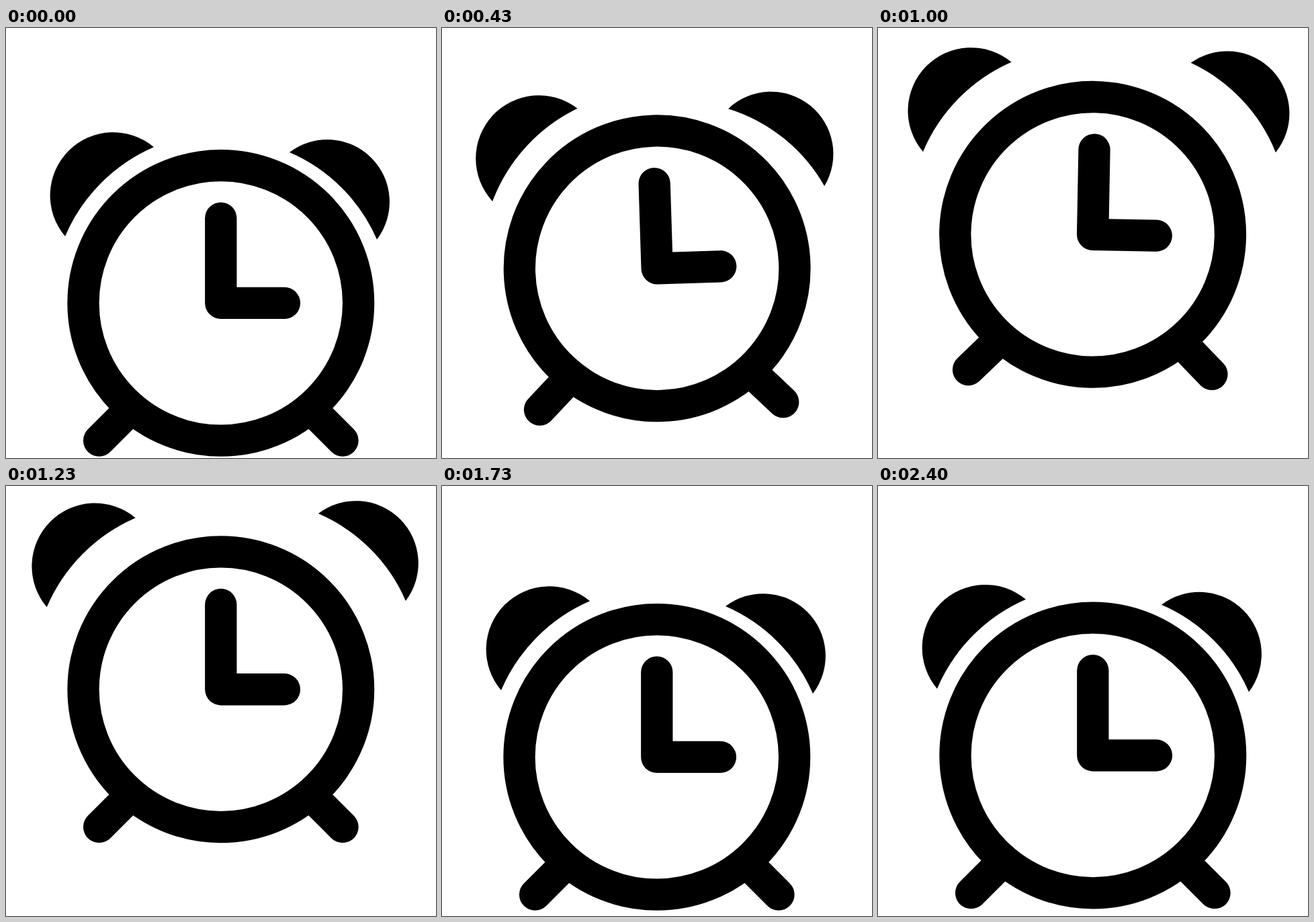
Recreate the animation shown at these times as an HTML page. Size 640x640 px, loop 3.61 s.

```html
<!DOCTYPE html>
<html lang="en">
<head>
<meta charset="utf-8">
<title>Alarm clock</title>
<style>
  html, body { margin: 0; height: 100%; overflow: hidden; background: #fff; }
  svg { display: block; width: 100%; height: 100%; }
  .line { fill: none; stroke: #000; stroke-width: 47.3; stroke-linecap: round; stroke-linejoin: round; }
</style>
</head>
<body>
<svg viewBox="0 0 640 640">
  <g id="clock">
    <g class="line">
      <circle r="204.8"/>
      <path d="M0-126.3V0H94.6M-181.2 204.7l41-41M181.2 204.7l-41-41"/>
    </g>
    <path id="left" d="M-73.5 59.2A94 94 0 0 1 58.5-73.7A253 253 0 0 0-73.5 59.2Z"/>
    <path id="right" d="M-57.3-73A92.7 92.7 0 0 1 72.7 56.8A250 250 0 0 0-57.3-73Z"/>
  </g>
</svg>
<script>
const LOOP = 3610, TOP = 1200, LAND = 1670, DIP = 1835, REST = 2400;
const LOW = 409.5, HIGH = 298.5, UNDER = 396.8, FINAL = 401;
const [clock, left, right] = ['clock', 'left', 'right'].map(id => document.getElementById(id));

// Swing angles in degrees as [time, angle]
const bodySwing = [[0, 0], [430, -1.8], [530, -2.9], [770, -3.87], [1100, 3.2], [TOP, 0]];
const leftSwing = [[0, 0], [430, -.55], [770, -2.75], [TOP, 0]];
const rightSwing = [[0, 0], [430, -4.35], [770, 1.07], [TOP, 0]];

const mix = (a, b, p) => a + (b - a) * p;
const part = (t, a, b) => Math.min(1, Math.max(0, (t - a) / (b - a)));
const easeOut = p => 1 - (1 - p) ** 1.41;

function at(keys, t) {
  const i = keys.findIndex(k => k[0] > t);
  if (i < 0) return keys[keys.length - 1][1];
  const [t0, a] = keys[i - 1], [t1, b] = keys[i];
  return mix(a, b, part(t, t0, t1));
}

function height(t) {
  if (t < TOP) return mix(LOW, HIGH, easeOut(part(t, 0, TOP)));
  if (t < LAND) return mix(HIGH, LOW, part(t, TOP, LAND) ** 1.2);
  if (t < DIP) return mix(LOW, UNDER, easeOut(part(t, LAND, DIP)));
  return mix(UNDER, FINAL, part(t, DIP, REST));
}

function place(el, x, y, angle) {
  el.setAttribute('transform', `translate(${x} ${y}) rotate(${angle})`);
}

function draw(t) {
  const spread = part(t, 0, TOP) - part(t, TOP, LAND);
  // The body turns around a point slightly above the dial centre
  clock.setAttribute('transform',
    `translate(319.8 ${height(t)}) rotate(${at(bodySwing, t)} 0 -11)`);
  place(left, -158.3 - 29.2 * spread, -158.5 - 24.8 * spread, at(leftSwing, t));
  place(right, 159.5 + 45.9 * spread, -151.3 - 40 * spread, at(rightSwing, t));
}

const start = performance.now();
function frame() {
  draw((performance.now() - start) % LOOP);
  requestAnimationFrame(frame);
}
frame();
</script>
</body>
</html>
```
